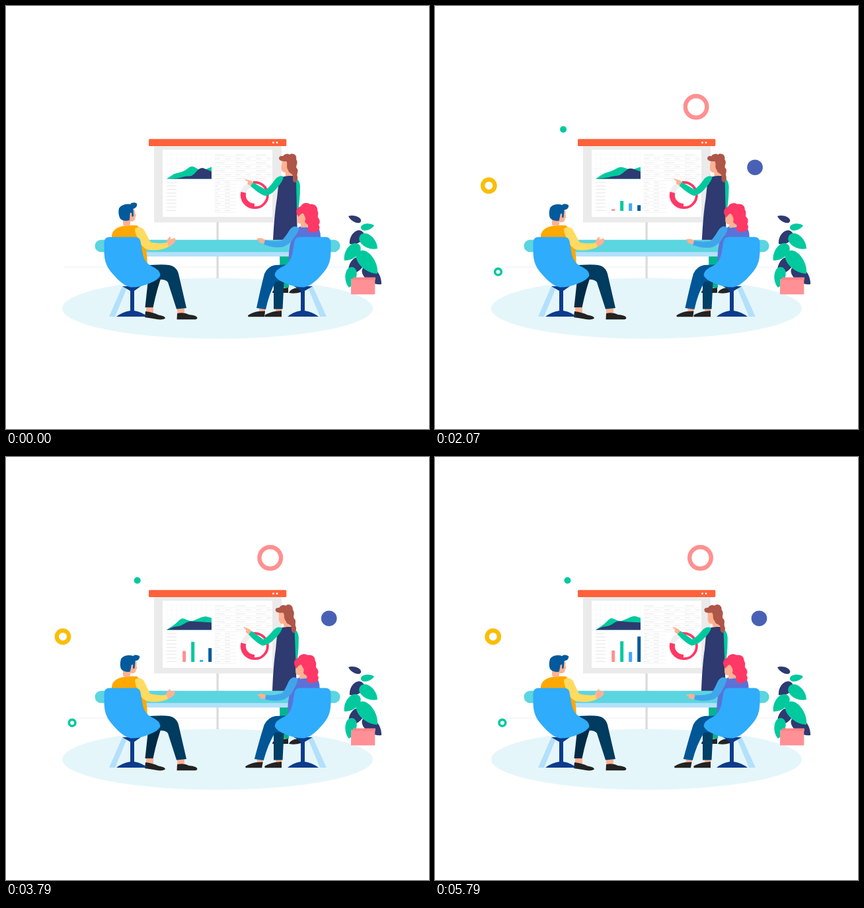
Write an HTML page that moves like this. It is 640 px wide and 640 px high and loops after 5.93 s.

```html
<!DOCTYPE html>
<html lang="en">
<head>
<meta charset="utf-8">
<title>Team presentation</title>
<style>
  html, body { margin: 0; width: 100%; height: 100%; overflow: hidden; background: #fff; }
  svg { display: block; width: 100%; height: 100%; }
  .skin { fill: #ffb193; }
  .green { fill: #00c99e; }
  .navy { fill: #2e3a70; }
  .hair { fill: #ae5648; }
  .shoe { fill: #232323; }
  .pale { fill: #b3e0fb; }
</style>
</head>
<body>
<svg viewBox="0 0 640 640">
  <defs>
    <g id="chair">
      <path fill="#0b3c8c" d="M176 424H204L194 431V461Q206 463 214 470H167Q176 463 188 461V431Z"/>
      <path fill="#2facfb" d="M148.500 358Q148.500 350 156 349.500H195Q202 349 203.500 356L207 376Q210 388 219 393Q233 399 233.500 407Q232 414 216 420Q202 426 189 425.500C179 424 170 415 162 406C153 396 149 388 148.500 372Z"/>
    </g>
  </defs>

  <path id="floorLine" stroke="#ededed"/>
  <ellipse cx="320" cy="457.5" rx="235" ry="46" fill="#e5f6fb"/>
  <rect x="318.4" y="327" width="3.4" height="85" fill="#dcdcdc"/>

  <g id="screen">
    <rect x="224" y="211" width="193" height="116.5" fill="#ebebeb"/>
    <rect x="237" y="217.5" width="166" height="101.5" fill="#fff"/>
    <rect x="216" y="201.3" width="208.3" height="10.7" rx="1.5" fill="#ff613a"/>
    <circle cx="404.5" cy="206.7" r="1.4" fill="#fff"/>
    <circle cx="410" cy="206.7" r="1.4" fill="#fff"/>
    <path id="grid" stroke="#f7f7f7" stroke-width=".7"/>
    <path id="rules" stroke="#f0f0f0" stroke-width=".8"/>
    <path id="notes" stroke="#e6e6e6"/>
    <path id="hillBack" class="green"/>
    <path id="hillFront" class="navy"/>
    <rect class="bar" x="267.2" width="5" fill="#ff9090"/>
    <rect class="bar" x="280.2" width="5" fill="#00c99e"/>
    <rect class="bar" x="293.2" width="5" fill="#40a9ff"/>
    <rect class="bar" x="306.2" width="5" fill="#005a9c"/>
    <g fill="none">
      <path d="M359 286A17 17 0 0 1 376 269" stroke="#efefef" stroke-width="8"/>
      <path d="M374 267A19.2 19.2 0 1 1 376 305.2" stroke="#ff3866" stroke-width="3.8"/>
      <path d="M359.3 282A17 17 0 0 0 376 303" stroke="#ff3866" stroke-width="8"/>
    </g>
  </g>

  <g id="dots">
    <circle cx="398" cy="152.6" r="16.3" fill="#fff" stroke="#ff9090" stroke-width="6.4"/>
    <circle cx="487" cy="244.2" r="11.8" fill="#4961b5"/>
    <circle cx="84.3" cy="271.7" r="9.2" fill="#fff" stroke="#f9be08" stroke-width="6.4"/>
    <circle cx="197" cy="186.7" r="5" class="green"/>
    <circle cx="98.4" cy="402.2" r="4.8" fill="#fff" stroke="#00c99e" stroke-width="3.6"/>
  </g>

  <path fill="#00b58f" d="M414 376H429L428 426H415Z"/>
  <path class="shoe" d="M403 434Q403 429 411 428L427 426V434ZM428 434Q430 429 437 427L446 426V433Q437 436 428 434Z"/>
  <g id="speaker">
    <path class="green" d="M436 260Q444 261 445 273Q445 288 443 303L438 322L433 300Z"/>
    <path class="navy" d="M413 263Q418 256 430 257H434Q439 258 439 266L441 354H404Q406 315 410 291Z"/>
    <g id="speakerHead">
      <path class="skin" d="M418 233L416.500 244Q416 252 423 252V257H434V238Z"/>
      <path class="hair" d="M413 231C413 226 417 227 419 227C422 223 427 223 429 225C434 221 441 226 439 232C443 238 438 241 439.500 245C444 249 439 254 441 258C442 263 439 267 437 267C433 266 434 262 434 258C434 252 427 254 427 248C423 244 427 238 424 235C420 235 414 235 413 231Z"/>
    </g>
    <g id="speakerArm">
      <path class="skin" d="M375 268L371 264.500L362 261.800Q361 263 366 266Q364 270 369 271.500L373 272Z"/>
      <path class="green" d="M420 258Q412 255 406 264Q399 274 393 278L374 267L370 272.500Q385 286 393 287.500Q403 285 411 274Q419 265 420 258Z"/>
    </g>
  </g>

  <path class="pale" d="M160 371H480V379H160ZM176 424H184L165 470H156ZM456 424H464L485 470H475Z"/>
  <rect x="134.500" y="353.700" width="371" height="18.600" rx="9.300" fill="#5bd5e0"/>

  <path id="darkLeaves" class="navy"/>
  <path id="leaves" class="green"/>
  <rect x="522" y="413" width="36.300" height="23.300" fill="#ff9196"/>
  <rect x="525" y="410.500" width="34" height="4" fill="#ff8288"/>

  <g id="man">
    <path class="skin" d="M212 454H223V464H212ZM259 456H270V467H259Z"/>
    <path class="shoe" d="M211 462Q222 463 231 467.500Q241 469 241 472.500Q236 476 223 473L210 471ZM259 465Q270 463 277 467Q289 468 289.500 472Q289 474.500 284 474.300H258.500Z"/>
    <path fill="#002c47" d="M216 405H237Q229 425 222.500 456H210.500Z"/>
    <path fill="#003b60" d="M205 393Q235 390 247 392Q258 394 261 405L273 457L258 458.500L245 418Q241 413 230 414L205 415Z"/>
    <path fill="#ffa800" d="M160 356V347Q161 339 170 335Q180 331 198 332Q208 340 211 362Q214 378 214 394H165Z"/>
    <path class="skin" d="M177 318H188V331Q182 335 177 331Z"/>
    <g id="manHead">
      <path class="skin" d="M184 308H194.500Q195 314 197 318L195.500 319Q196 326 190 326H184Z"/>
      <path fill="#005a9c" d="M171 306C175 300 183 299 188 300C190 297 195 297 198 299C199 303 196 306 192.500 307L193 318L190.500 319L190 313Q187 312 187.500 317L187 324C182 326 176 325 173 322C170 317 170 310 171 306Z"/>
    </g>
    <g id="manArm">
      <path class="skin" d="M242 359Q244 352 248 349Q250 349 249 353L255 351Q258 353 255 358Q250 364 243 364.500Z"/>
      <path fill="#ffdb61" d="M195 337Q203 331 209 339Q214 349 219 357.500Q232 360 244 358L246 364.500Q232 371 215 369Q206 366 202 356Q195 345 195 337Z"/>
    </g>
    <use href="#chair"/>
  </g>

  <g id="guest">
    <path class="skin" d="M408 454H417V465H408Z"/>
    <path class="shoe" d="M391.500 467.500Q400 463 407 462L417 461V470.300H391.500Z"/>
    <path fill="#003f66" d="M405 410H421L418.500 458.500H405Z"/>
    <g id="guestLeg">
      <path class="skin" d="M383 455H392V465H383Z"/>
      <path class="shoe" d="M366 468Q374 463 382 462L392 461.500L391 470.300H366.500Z"/>
      <path fill="#005696" d="M430 391L407 392Q396 394 391 405Q385 428 379 457L393 459Q398 435 408 417L430 415Z"/>
    </g>
    <g id="guestTorso">
      <path fill="#5b72d8" d="M428 392Q426 362 437 341Q443 331 455 332H469Q476 337 476 350L470 392Z"/>
      <g id="guestHead">
        <path class="skin" d="M441.500 313L440.500 323Q440 330 446 329V335H457V312Z"/>
        <path fill="#ff3866" d="M440 315C437 306 444 304 446 303C450 296 458 298 460 300C466 299 472 303 471 309C474 314 471 317 472 320C476 324 475 329 473 331C477 337 472 342 467 342C461 344 455 341 457 335C460 331 453 330 452 326C455 321 451 317 450 314C446 313 444 318 442 319Z"/>
      </g>
      <g id="guestArm">
        <path class="skin" d="M393 354L386 351Q379 351 379 353L384 355Q379 356 384 358L391 360Z"/>
        <path fill="#40a6ec" d="M443 336Q436 330 429 339Q423 349 417 355Q403 357 392 354L390 360.500Q405 367 419 364.500Q430 361 436 350Q443 342 443 336Z"/>
      </g>
    </g>
    <use href="#chair" transform="matrix(-1 0 0 1 640 0)"/>
  </g>
</svg>
<script>
const LOOP = 5930, STEP = 71.4, LAST = 5790;
const SWING = 2375, SWAY = 3000;
const $ = id => document.getElementById(id);
const clamp = v => Math.max(0, Math.min(1, v));
const smooth = v => (v = clamp(v)) * v * (3 - 2 * v);
const wave = (t, period) => Math.cos(2 * Math.PI * t / period);
const mix = (a, b, u) => a.map((v, i) => v + (b[i] - v) * u);
const set = (id, value, name = 'transform') => $(id).setAttribute(name, value);
const turn = (id, angle, x, y) => set(id, `rotate(${angle} ${x} ${y})`);
const skew = (id, k, y) => set(id, `matrix(1 0 ${k} 1 ${-k * y} 0)`);
const barEls = document.querySelectorAll('.bar');

// Hill ridges as [x, height] corners at both ends of the swing
const backHill = [
  [[243, 0], [255, 8], [268, 11], [281, 20], [296, 12], [311, 18]],
  [[243, 0], [255, 8], [266, 19], [280, 12], [301, 22], [311, 18]]
];
const frontHill = [
  [[243, 0], [260, 1], [272, 4], [281, 4], [295, 18], [311, 11]],
  [[243, 0], [254, 5], [263, 6], [276, 14], [290, 12], [311, 11]]
];
function hill([from, to], q) {
  const base = 261.6;
  const p = from.map((a, i) => mix(a, to[i], q)).map(([x, h]) => [x, base - h]);
  let d = `M${p[0]}`;
  for (let i = 1; i < p.length - 1; i++)
    d += `L${mix(p[i], p[i - 1], .3)}Q${p[i]} ${mix(p[i], p[i + 1], .3)}`;
  return `${d}L${p[p.length - 1]}V${base}H243Z`;
}

// Teardrop from a sharp tip to a round end
function leaf(x, y, endX, endY, width) {
  const dx = endX - x, dy = endY - y;
  const at = (u, v) => `${x + dx * u - dy * v} ${y + dy * u + dx * v}`;
  return `M${x} ${y}C${at(.3, width)} ${at(1, width)} ${at(1, 0)}C${at(1, -width)} ${at(.3, -width)} ${x} ${y}`;
}

function drawStill() {
  set('darkLeaves', leaf(518, 318, 537, 326, .3) + leaf(520, 360, 540, 342, .42)
    + leaf(519, 405, 538, 382, .42) + leaf(568, 421, 541, 395, .36), 'd');
  set('leaves', leaf(557, 332, 537, 336, .33) + leaf(562, 367, 536, 347, .38)
    + leaf(512, 385, 534, 361, .38) + leaf(562, 405, 533, 372, .34) + leaf(519, 426, 524, 395, .36), 'd');

  let grid = '', rules = '', notes = '';
  for (let x = 243; x <= 311; x += 7.5) grid += `M${x} 222V261`;
  for (let y = 224; y < 262; y += 7.5) grid += `M243 ${y}H311`;
  for (let i = 0; i < 7; i++) {
    const y = 225.2 + i * 6;
    rules += `M316 ${y + 3}H399`;
    for (let x = 316; x < 395; x += i % 2 ? 15.5 : 31) notes += `M${x} ${y}h${i % 2 ? 8 : 15}`;
  }
  for (let i = 0; i < 9; i++) {
    const y = 267 + i * 5.3;
    notes += `M243 ${y}h15M316 ${y}h${i % 2 ? 5 : 8}M331 ${y}h8`;
    rules += `M316 ${y + 2.6}H349`;
  }
  set('grid', grid, 'd');
  set('rules', rules, 'd');
  set('notes', notes, 'd');
}

function draw(t) {
  const q = (1 - wave(t, SWING)) / 2;
  const intro = clamp(t / 640);
  const scale = 1 + .22 * (1 - intro) ** 2;
  const drift = .3 + 4.7 * wave(t - 180, SWAY);

  set('floorLine', `M${88 + 18 * smooth(intro)} 395H520`, 'd');
  set('dots', `translate(${285 + drift} 271) scale(${scale}) translate(-285 -271)`);
  set('dots', smooth(intro * 1.3), 'opacity');

  const grow = smooth(t / 500);
  const dip = smooth((t - 800) / 3900) - smooth((t - 4700) / 1090);
  const heights = [18 * q, 12 + 20 * q, 15 - 14 * dip, 4 + (27 + 9 * wave(t - SWING / 2, 2 * SWING)) * q];
  barEls.forEach((bar, i) => {
    const h = heights[i] * grow;
    bar.setAttribute('y', 310 - h);
    bar.setAttribute('height', h);
  });
  set('hillBack', hill(backHill, q), 'd');
  set('hillFront', hill(frontHill, q), 'd');

  skew('speaker', .015 * q, 430);
  turn('speakerHead', -6 * q, 428, 258);
  turn('speakerArm', 5.8 * q, 413, 262);

  turn('manHead', 8 * smooth(q / .15), 182, 330);
  turn('manArm', 3 * q, 202, 340);

  set('guestTorso', `translate(${-1.5 * q} 0)`);
  turn('guestHead', -4 * smooth(t / 600), 455, 338);
  turn('guestArm', -9 * q, 435, 340);
  skew('guestLeg', -.06 * q, 400);
}

const start = performance.now();
function tick() {
  const t = (performance.now() - start) % LOOP;
  draw(Math.min(LAST, Math.floor(t / STEP + .1) * STEP));
  requestAnimationFrame(tick);
}

drawStill();
tick();
</script>
</body>
</html>
```
